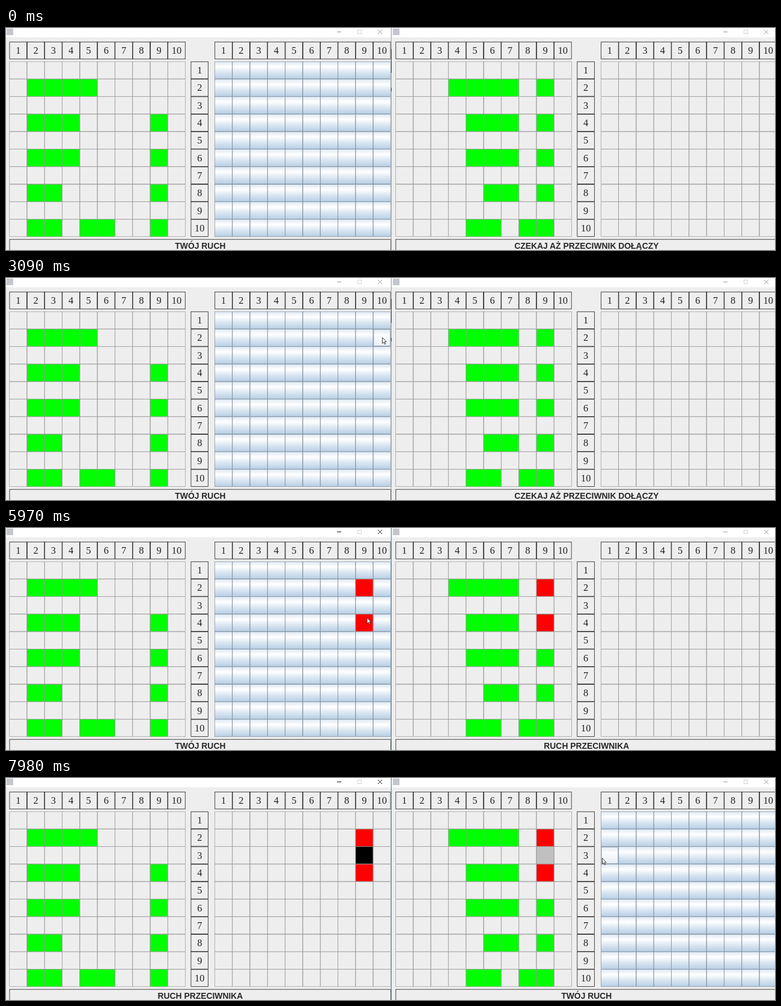
An HTML page that plays this animation: 1280x371 px, repeating every 8 s.

```html
<!DOCTYPE html>
<html lang="pl">
<head>
<meta charset="utf-8">
<style>
  html, body { margin: 0; width: 100%; height: 100%; overflow: hidden; background: #eee; }
  svg { display: block; }
  rect { stroke-width: .52; }
  .num { font: 16.4px "Liberation Serif", "Times New Roman", serif; fill: #222; text-anchor: middle; }
  .status { font: bold 13.9px "Liberation Sans", Arial, sans-serif; fill: #282828; text-anchor: middle; }
  .box { fill: #eee; stroke: #000; stroke-width: .7; }
  .off { fill: #eee; stroke: #999; }
  .on { fill: url(#face); stroke: #7a8a99; }
  .ship { fill: #0f0; stroke: #999; }
  .hit { fill: #f00; stroke: #999; }
  .miss { fill: #000; stroke: #999; }
  .splash { fill: #c0c0c0; stroke: #999; }
  .down { fill: #b8cfe5; stroke: #7a8a99; }
  .lit { fill: url(#glow); stroke: #8fa3b8; stroke-width: 1; }
  .caption { fill: none; stroke: #999; }
  .caption.active { stroke: #111; }
  .faint { fill: none; stroke: #d4d4d4; stroke-width: 1; }
</style>
</head>
<body>
<svg id="stage" width="1280" height="371" viewBox="0 0 1280 371">
  <defs>
    <linearGradient id="face" x2="0" y2="1">
      <stop offset="0" stop-color="#dde8f3"/>
      <stop offset=".3" stop-color="#fff"/>
      <stop offset=".6" stop-color="#dde8f3"/>
      <stop offset="1" stop-color="#b8cfe5"/>
    </linearGradient>
    <linearGradient id="glow" x2="0" y2="1">
      <stop offset="0" stop-color="#e4ecf5"/>
      <stop offset=".35" stop-color="#fbfcfe"/>
      <stop offset="1" stop-color="#e8eef5"/>
    </linearGradient>
  </defs>
</svg>
<script>
const LOOP = 8000, CELL = 29.3, TOP = 55.9, HEAD = 22.9;
const stage = document.getElementById('stage');

function add(tag, attrs, text = '') {
  const el = document.createElementNS('http://www.w3.org/2000/svg', tag);
  for (const key in attrs) el.setAttribute(key, attrs[key]);
  el.textContent = text;
  return stage.appendChild(el);
}

// Borders lie inside each cell, so neighbours together form one line.
function square(x, y, cls, inset) {
  const size = CELL - 2 * inset;
  return add('rect', { class: cls, x: x + inset, y: y + inset, width: size, height: size });
}

function label(x, y, value) {
  square(x, y, 'box', .35);
  add('text', { class: 'num', x: x + CELL / 2, y: y + CELL / 2 + 5.6 }, value);
}

function board(x0) {
  for (let i = 0; i < 10; i++) label(x0 + i * CELL, HEAD, i + 1);
  add('rect', { x: x0, y: TOP, width: 10 * CELL, height: 10 * CELL, fill: '#999' });
  const cells = [];
  for (let row = 1; row <= 10; row++) {
    for (let col = 1; col <= 10; col++) {
      const el = square(x0 + (col - 1) * CELL, TOP + (row - 1) * CELL, 'off', .26);
      cells.push({ el, row, col });
    }
  }
  return { x0, cells };
}

function gameWindow(dx) {
  add('rect', { x: dx, y: 0, width: 641, height: 15.5, fill: '#fff' });
  add('rect', { x: dx + 1, y: 1, width: 11, height: 11, fill: '#c3c7cc' });
  const caption = add('path', {
    class: 'caption', d: `M${dx + 551} 6.5h7M${dx + 619} 3l7 7m0-7l-7 7`
  });
  add('rect', { class: 'faint', x: dx + 585.5, y: 3.5, width: 6, height: 6 });
  const own = board(dx + 5.6);
  for (let i = 0; i < 10; i++) label(dx + 307.6, TOP + i * CELL, i + 1);
  const foe = board(dx + 347.4);
  add('rect', { class: 'box', x: dx + 6, y: 353.2, width: 634.3, height: 30 });
  const status = add('text', { class: 'status', x: dx + 323.4, y: 369 });
  return { own, foe, caption, status };
}

const left = gameWindow(0);
const right = gameWindow(642.9);

const divider = add('rect', { x: 640.7, y: 0, width: 1.2, height: 371 });
const shade = add('path', { d: 'M641.4 35v40M641.4 100v6', stroke: '#444' });
const hover = square(0, 0, 'lit', .8);
const cursor = add('path', {
  d: 'M.5 .3V10.2L2.7 8.2L4.3 11.7L5.8 11L4.2 7.6H7.1Z',
  fill: '#fff', stroke: '#222', 'stroke-width': .85
});

// Ships lie on even rows, getting shorter downwards.
const shipLength = row => Math.round(4.2 - row / 4);

function leftShip(row, col) {
  if (row % 2) return false;
  return (col >= 2 && col < 2 + shipLength(row)) || (col === 9 && row > 2)
    || (row === 10 && (col === 5 || col === 6));
}

function rightShip(row, col) {
  if (row % 2) return false;
  if (row === 10) return col > 4 && col < 10 && col !== 7;
  return (col <= 7 && col > 7 - shipLength(row)) || col === 9;
}

// All shots fall in column 9: pressed at `time`, answered at `time + 80`.
const SHOT_COL = 9, ANSWER = 80;
const shots = [
  { row: 2, time: 3640, foe: 'hit', own: 'hit' },
  { row: 4, time: 5430, foe: 'hit', own: 'hit' },
  { row: 3, time: 6660, foe: 'miss', own: 'splash' }
];
const [first, , last] = shots;
const SWAP = last.time + ANSWER, SWAPPED = SWAP + 70;

const shotAt = (row, col, t) =>
  col === SHOT_COL && shots.find(s => s.row === row && t >= s.time);

function noise(n) {
  const v = Math.sin(n * 12.9898) * 43758.5453;
  return v - Math.floor(v);
}

function leftFoe(row, col, t) {
  const shot = shotAt(row, col, t);
  if (shot) return t < shot.time + ANSWER ? 'down' : shot.foe;
  const cleared = row < 3 || (row === 3 && col < SHOT_COL);
  return t >= SWAPPED || (t >= SWAP && cleared) ? 'off' : 'on';
}

function rightOwn(row, col, t) {
  const shot = shotAt(row, col, t - ANSWER);
  if (shot) return shot.own;
  return rightShip(row, col) ? 'ship' : 'off';
}

// Buttons come alive from the top, raggedly in the middle rows.
function rightFoe(row, col, t) {
  const ready = noise(row * 10 + col) < (8 - row) / 4;
  return t >= SWAPPED || (t >= SWAP && ready) ? 'on' : 'off';
}

// Pointer moves: start, end, destination; sampled about every 78 ms.
const moves = [
  [450, 1010, 545, 256], [1240, 1930, 581, 132], [2010, 2390, 590, 102],
  [2560, 2710, 572, 101], [2860, 3090, 626, 99], [3170, 3490, 600, 104.5],
  [4420, 5050, 600, 152], [5970, 6430, 603, 134.5], [7430, 7980, 992, 133.5]
];

function pointer(t) {
  if (t < moves[0][0]) return null;
  let x = 845, y = 376;
  for (const [start, end, toX, toY] of moves) {
    if (t < start) break;
    const count = Math.round((end - start) / 78) + 1;
    const gap = (end - start) / (count - 1);
    const k = Math.min(count, Math.floor((t - start + 8) / gap) + 1) / count;
    x += (toX - x) * k;
    y += (toY - y) * k;
  }
  return { x, y };
}

function paint({ cells }, rule, t) {
  for (const { el, row, col } of cells) el.setAttribute('class', rule(row, col, t));
}

function showHover(pos) {
  hover.setAttribute('visibility', 'hidden');
  if (!pos) return;
  const row = Math.floor((pos.y - TOP) / CELL);
  for (const { x0, cells } of [left.foe, right.foe]) {
    const col = Math.floor((pos.x - x0) / CELL);
    if (col < 0 || col > 9 || row < 0 || row > 9) continue;
    if (cells[row * 10 + col].el.getAttribute('class') !== 'on') continue;
    hover.setAttribute('transform', `translate(${x0 + col * CELL} ${TOP + row * CELL})`);
    hover.setAttribute('visibility', 'visible');
  }
}

function draw(t) {
  paint(left.own, (row, col) => leftShip(row, col) ? 'ship' : 'off', t);
  paint(left.foe, leftFoe, t);
  paint(right.own, rightOwn, t);
  paint(right.foe, rightFoe, t);

  const active = t >= first.time;
  left.caption.setAttribute('class', active ? 'caption active' : 'caption');
  divider.setAttribute('fill', active ? '#4b8fb5' : '#a8a8a8');
  shade.setAttribute('visibility', active ? 'hidden' : 'visible');

  const mine = 'TWÓJ RUCH', theirs = 'RUCH PRZECIWNIKA';
  left.status.textContent = t < SWAPPED ? mine : theirs;
  right.status.textContent = t < first.time + ANSWER ? 'CZEKAJ AŻ PRZECIWNIK DOŁĄCZY'
    : t < SWAP ? theirs : mine;

  const pos = pointer(t);
  showHover(pos);
  cursor.setAttribute('visibility', pos ? 'visible' : 'hidden');
  if (pos) cursor.setAttribute('transform', `translate(${pos.x} ${pos.y})`);
}

const begin = performance.now();
function tick() {
  draw((performance.now() - begin) % LOOP);
  requestAnimationFrame(tick);
}
tick();
</script>
</body>
</html>
```
